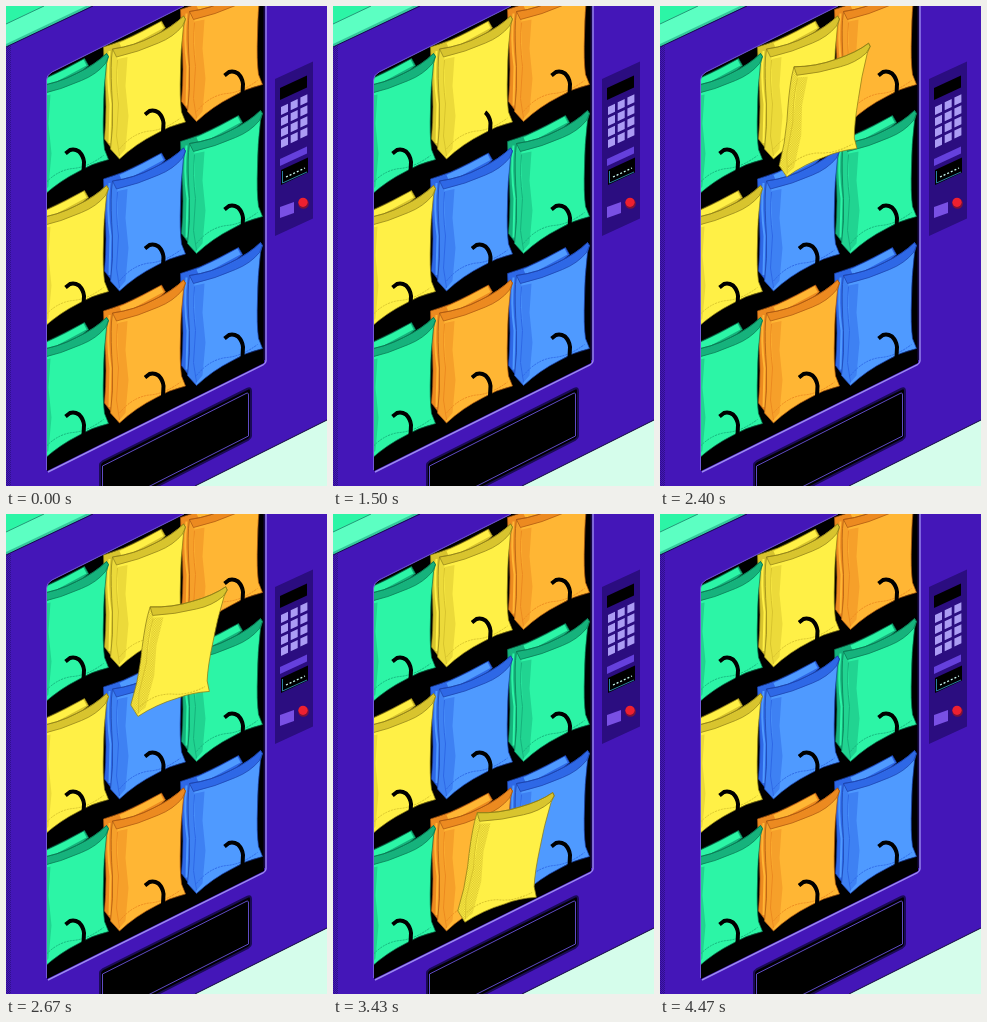
Recreate the animation shown at these times as an HTML page with a canvas. Size 321 by 480 pixels, loop 4.51 s.

```html
<!DOCTYPE html>
<html lang="en">
<head>
<meta charset="utf-8">
<title>Vending machine</title>
<style>
html, body { margin: 0; width: 100%; height: 100%; overflow: hidden; background: #4416b8; }
canvas { display: block; width: 321px; height: 480px; image-rendering: pixelated; }
</style>
</head>
<body>
<canvas id="stage" width="321" height="480"></canvas>
<script>
const W = 321, H = 480, LOOP = 4510, STEPS = 135;
const ctx = document.getElementById('stage').getContext('2d');
const scene = document.createElement('canvas');
scene.width = W;
scene.height = H;
const back = scene.getContext('2d');

// main, shade, outline
const GREEN = ['#2cf5a6', '#16b27c', '#0a7350'];
const YELLOW = ['#fff046', '#d8c42e', '#8d7d17'];
const ORANGE = ['#ffb634', '#ec8a20', '#a85510'];
const BLUE = ['#4f9aff', '#2e68e6', '#1b3fa8'];
const SHELVES = [[GREEN, YELLOW, ORANGE], [YELLOW, BLUE, GREEN], [GREEN, ORANGE, BLUE]];
const HOOK_ROWS = [0, 134, 263];

const BODY = new Path2D('M106 43 Q128 40 147 30 Q166 21 177 10 L179 13 L177 20 Q174 45 174 66 Q173 92 175 106 L179 116 Q162 120 149 128 Q129 138 113 153 L104 143 Q107 120 106 98 Q104 70 105 52Z');
const SIDE = new Path2D('M106 43 L111 52 Q109 74 112 98 L110 130 L113 153 L104 143 Q107 120 106 98 Q104 70 105 52Z');
const FLAP = new Path2D('M106 43 Q128 40 147 30 Q166 21 177 10 L179 13 L176 20 Q167 31 152 37 Q132 46 110 51Z');
const FADE = new Path2D('M111 53 L121 51 L119 80 L122 110 L119 143 L113 150 L110 130 L112 98Z');
const SEAM = new Path2D('M113 143 Q126 127 143 125 Q158 124 174 112');
const REAR = new Path2D('M97 41 Q118 35 136 25 L155 15 L159 22 L112 62 L112 147 L104 141 L98 133 Q101 100 98 70Z');
const HOOK = new Path2D('M157 127 L157.5 117 Q157 111 152.5 106.5 Q148 103.5 143.5 105 L139 108.5');
const WINDOW = new Path2D('M41 74 Q41 69 46 66 L178 0 H258 V357 L41 465Z');

const checkers = {};
function checker(color) {
  if (!checkers[color]) {
    const tile = document.createElement('canvas');
    tile.width = tile.height = 2;
    const g = tile.getContext('2d');
    g.fillStyle = color;
    g.fillRect(0, 0, 1, 1);
    g.fillRect(1, 1, 1, 1);
    checkers[color] = back.createPattern(tile, 'repeat');
  }
  return checkers[color];
}

function fill(g, path, color) {
  g.fillStyle = color;
  g.fill(path);
}

function line(g, path, color, width = 1) {
  g.strokeStyle = color;
  g.lineWidth = width;
  g.stroke(path);
}

function poly(g, d, color) {
  fill(g, new Path2D(d), color);
}

function trace(g, d, color, width) {
  line(g, new Path2D(d), color, width);
}

function disc(g, x, y, r, color) {
  g.fillStyle = color;
  g.beginPath();
  g.arc(x, y, r, 0, 7);
  g.fill();
}

// parallelogram whose top edge rises to the right
function slab(g, x, y, w, h, color, slope = 0.46) {
  const rise = w * slope;
  poly(g, `M${x} ${y} l${w} ${-rise} v${h} l${-w} ${rise}Z`, color);
}

function drawBag(g, [main, shade, edge]) {
  fill(g, BODY, main);
  fill(g, FADE, checker(shade));
  fill(g, SIDE, checker(shade));
  fill(g, FLAP, shade);
  trace(g, 'M111 54 Q109 74 112 98 L110 130 L113 150', shade);
  line(g, FLAP, edge, 0.7);
  g.setLineDash([2, 1]);
  line(g, SEAM, shade);
  g.setLineDash([]);
  line(g, BODY, edge, 0.7);
}

function drawRear(g, [main, shade, edge]) {
  fill(g, REAR, shade);
  poly(g, 'M113 37 L136 26 L154 16 L157 22 L116 44Z', main);
  trace(g, 'M103 45 Q100 70 104 98 L103 137', main, 2);
  line(g, REAR, edge, 0.7);
}

function drawHook(g, length = 60) {
  if (length <= 0) return;
  g.setLineDash([length, 100]);
  line(g, HOOK, '#000', 4);
  g.setLineDash([]);
}

function at(g, x, y, draw) {
  g.save();
  g.translate(x, y);
  draw();
  g.restore();
}

function drawCabinet(g) {
  g.fillStyle = '#4416b8';
  g.fillRect(0, 0, W, H);
  g.fillStyle = checker('#30108c');
  g.fillRect(0, 40, 5, 440);

  poly(g, 'M0 0 H86 L0 41Z', '#35c99c');
  poly(g, 'M0 0 H80 L0 38Z', '#5cffc2');
  poly(g, 'M0 0 H38 L0 18Z', '#2cf5a6');
  trace(g, 'M0 18 L38 0', '#249878');
  trace(g, 'M0 41 L87 0', '#180850');

  poly(g, 'M321 414 V480 H189Z', '#d5fdeb');
  trace(g, 'M189 480 L321 414', '#12063c');
}

function drawTray(g) {
  const tray = new Path2D('M94 484 V459 Q94 457 97 455 L241 383 Q245 381 245 385 V430 Q245 432 242 434 L144 484Z');
  fill(g, tray, '#000');
  line(g, tray, '#1a0a56', 2);
  trace(g, 'M96.5 482 V460 L240 387.5 Q242.5 386 242.5 389 V430 L140 482', '#5f4bc4');
}

function drawPanel(g) {
  slab(g, 269, 73, 38, 157, '#2b0d80');
  slab(g, 274, 82, 27, 12, '#000');
  for (let row = 0; row < 4; row++)
    for (let col = 0; col < 3; col++)
      slab(g, 275 + col * 9.7, 101 + row * 11 - col * 4.8, 7, 8, '#ab9cf4');
  slab(g, 274, 153, 27, 7, '#6540dc');
  slab(g, 275, 164, 27, 15, '#000');
  trace(g, 'M276.5 165 V177 L301 166', '#2b7f9e');
  g.setLineDash([2, 2]);
  trace(g, 'M280 171 L299 162', '#c8f8f0', 1.3);
  g.setLineDash([]);
  slab(g, 274, 201, 14, 11, '#7950e4', 0.35);
  disc(g, 297.5, 197.5, 5.3, '#7c1238');
  disc(g, 297, 196.3, 4.6, '#ee2030');
}

function drawShelves(g) {
  fill(g, WINDOW, '#000');
  g.save();
  g.clip(WINDOW);
  SHELVES.forEach((shelf, row) => {
    for (let col = 2; col >= 0; col--) {
      const side = col - 1;
      at(g, side * 77 + 0.5, row * 132 - side * 37.5, () => {
        drawRear(g, shelf[col]);
        drawBag(g, shelf[col]);
      });
    }
    for (let side = -1; side <= 1; side++) {
      if (row === 0 && side === 0) continue;
      at(g, side * 79.5, HOOK_ROWS[row] - side * 39, () => drawHook(g));
    }
  });
  g.restore();
  trace(g, 'M40.5 464 V74 Q40.5 69 46 66 L178 0', '#7359d8');
  trace(g, 'M258.5 0 V354', '#160746', 2);
  trace(g, 'M260 0 V355 Q260 357 257 359 L42 466', '#9b8af0', 1.4);
}

// time, visible length of the turning coil
const COIL = [[0, 44], [950, 44], [1500, 21], [2070, 12], [2350, 0], [2800, 0], [3300, 44], [LOOP, 44]];

function sample(table, t) {
  const i = table.findIndex(k => k[0] > t);
  const [t0, a] = table[i - 1], [t1, b] = table[i];
  return a + (b - a) * (t - t0) / (t1 - t0);
}

function drawFalling(t) {
  const start = 2120;
  if (t < start || t > 3900) return;
  const p = Math.min(1, (t - start) / 380);
  const push = p * p * (3 - 2 * p);
  const drop = 1.59e-4 * Math.max(0, t - 2181) ** 2;
  ctx.save();
  ctx.translate(141 + 31 * push, 81 + 22 * push + drop);
  ctx.rotate(10 * Math.PI / 180 * push);
  ctx.translate(-141, -81);
  drawBag(ctx, YELLOW);
  ctx.restore();
}

function draw(time) {
  const step = LOOP / STEPS;
  const t = Math.floor((time % LOOP) / step) * step;
  ctx.drawImage(scene, 0, 0);
  ctx.save();
  ctx.clip(WINDOW);
  drawHook(ctx, sample(COIL, t));
  drawFalling(t);
  ctx.restore();
}

drawCabinet(back);
drawShelves(back);
drawTray(back);
drawPanel(back);

const begin = performance.now();
function tick() {
  draw(performance.now() - begin);
  requestAnimationFrame(tick);
}
tick();
</script>
</body>
</html>
```
